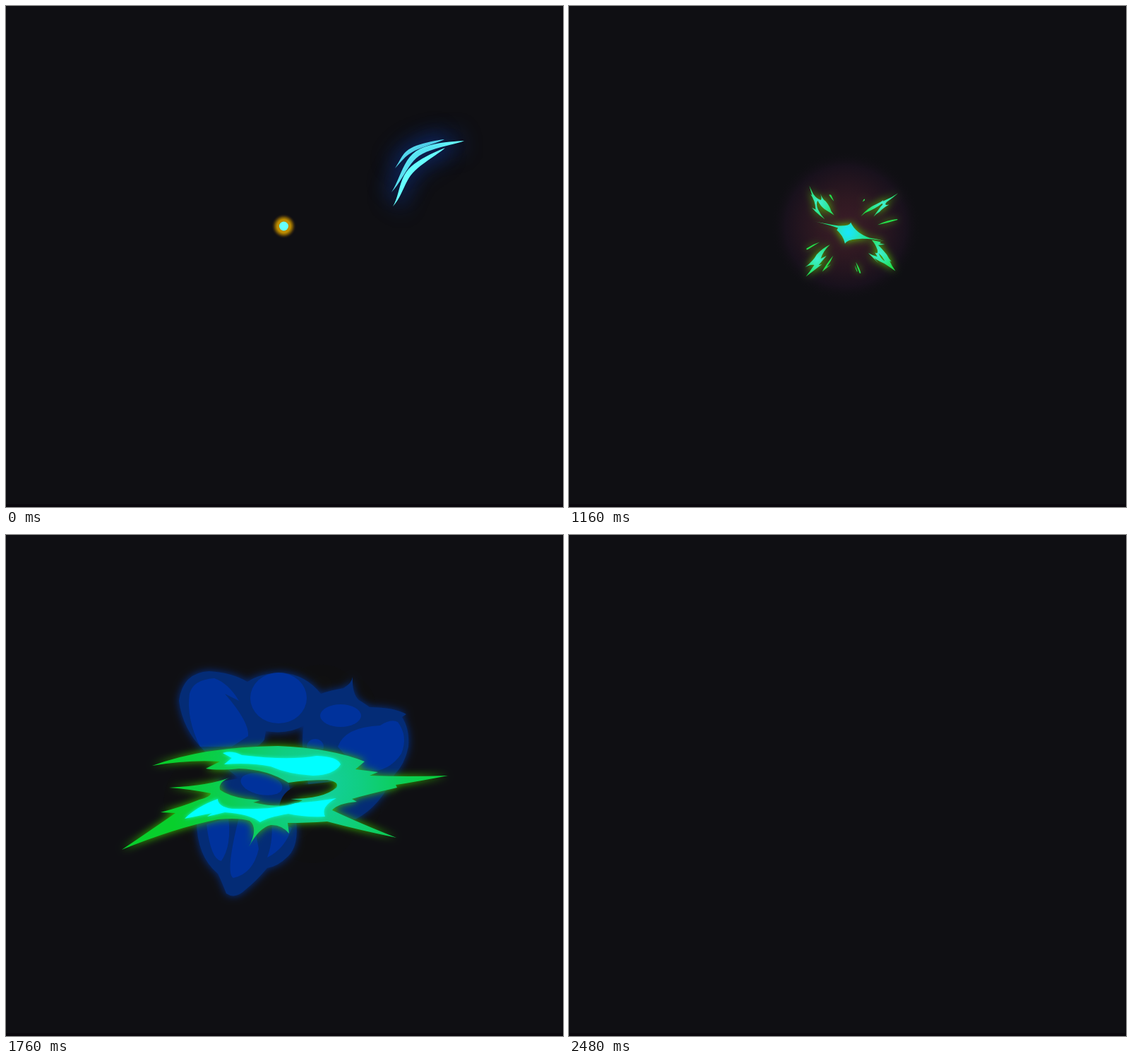
Write an HTML page with a canvas that moves like this. It is 789 px wide and 710 px high and loops after 2.92 s.

```html
<!DOCTYPE html>
<html lang="en">
<head>
<meta charset="utf-8">
<title>Energy burst</title>
<style>
  html, body { margin: 0; width: 100%; height: 100%; overflow: hidden; background: #0f0f13; }
  canvas { display: block; }
</style>
</head>
<body>
<canvas id="stage" width="789" height="710"></canvas>
<script>
const ctx = document.getElementById('stage').getContext('2d');
const LOOP = 2920, STEP = 40, CX = 393.5, CY = 312;

const clamp = (x, a = 0, b = 1) => Math.min(b, Math.max(a, x));
const ramp = (t, a, b) => clamp((t - a) / (b - a));
const pulse = (t, a, b, c, d) => ramp(t, a, b) * (1 - ramp(t, c, d));
const mix = (a, b, k) => `rgb(${a.map((v, i) => Math.round(v + (b[i] - v) * k))})`;
const shape = d => new Path2D(d);

// Piecewise linear value from [time, value] pairs
function keyed(t, keys) {
  if (t <= keys[0][0]) return keys[0][1];
  for (let i = 1; i < keys.length; i++) {
    const [a, x] = keys[i - 1], [b, y] = keys[i];
    if (t <= b) return x + (y - x) * (t - a) / (b - a);
  }
  return keys[keys.length - 1][1];
}

function radial(x, y, r0, r1, stops) {
  const g = ctx.createRadialGradient(x, y, r0, x, y, r1);
  stops.forEach(([at, color]) => g.addColorStop(at, color));
  return g;
}

function disc(x, y, r, fill) {
  ctx.fillStyle = fill;
  ctx.beginPath();
  ctx.arc(x, y, r, 0, 7);
  ctx.fill();
}

function oval(x, y, rx, ry, turn = 0) {
  ctx.beginPath();
  ctx.ellipse(x, y, rx, ry, turn, 0, 7);
  ctx.fill();
}

function glowFill(path, fill, glow, blur) {
  ctx.shadowColor = glow;
  ctx.shadowBlur = blur;
  ctx.fillStyle = fill;
  ctx.fill(path, 'evenodd');
  ctx.shadowBlur = 0;
}

// Draw scaled around a point with a given opacity
function layer(alpha, scale, x, y, draw) {
  if (alpha <= 0 || scale <= 0) return;
  ctx.save();
  ctx.globalAlpha = alpha;
  ctx.translate(x, y);
  ctx.scale(scale, scale);
  ctx.translate(-x, -y);
  draw();
  ctx.restore();
}

/* ---- charging streaks ---- */

const HUB = [CX, CY];
const streak = (start, lo, hi, speed, width, pts) => ({ start, lo, hi, speed, width, pts: [...pts, HUB] });

const streaks = [
  streak(0, 0, 2, .018, 6, [[621, 189], [575, 204], [551, 230], [505, 295], [445, 325]]),
  streak(0, 0, 2, .018, 8, [[649, 191], [583, 209], [546, 264], [500, 315], [440, 332]]),
  streak(0, 0, 2, .018, 8, [[622, 201], [573, 234], [548, 284], [505, 325], [445, 336]]),
  streak(320, 1, 3, .015, 7, [[560, 165], [473, 219], [438, 270], [408, 303]]),
  streak(320, 1, 3, .015, 5, [[575, 170], [491, 221], [464, 251], [439, 285], [412, 304]]),
  streak(320, 1, 3, .015, 5, [[322, 190], [336, 270], [354, 292], [380, 305]]),
  streak(320, 1, 5, .02, 7, [[480, 505], [412, 469], [382, 424], [365, 365], [369, 335], [384, 318]])
];

[40, 60, 350, 400, 450, 500, 540].forEach((start, i) => {
  const turn = 3.6 + i * 2.4;
  const reach = 150 + 165 * Math.max(0, Math.cos(turn));
  const pts = [0, 1, 2, 3, 4].map(j => {
    const a = turn + j * .32, r = reach * (1 - j / 5);
    return [CX + r * Math.cos(a), CY + r * Math.sin(a)];
  });
  streaks.push(streak(start, -2, 0, .03, 6, pts));
});

function along(pts, u) {
  const last = pts.length - 1, i = Math.min(Math.floor(u), last - 1), f = u - i;
  const [a, b, c, d] = [i - 1, i, i + 1, i + 2].map(k => pts[clamp(k, 0, last)]);
  return [0, 1].map(k => b[k] + f / 2 * (c[k] - a[k]
    + f * (2 * a[k] - 5 * b[k] + 4 * c[k] - d[k] + f * (3 * (b[k] - c[k]) + d[k] - a[k]))));
}

function drawStreak(s, t) {
  const last = s.pts.length - 1, shift = (t - s.start) * s.speed;
  const lo = clamp(s.lo + shift, 0, last), hi = clamp(s.hi + shift, 0, last);
  if (hi - lo < .05) return;
  const n = 22, line = [], left = [], right = [];
  for (let i = 0; i <= n; i++) line.push(along(s.pts, lo + (hi - lo) * i / n));
  line.forEach(([x, y], i) => {
    const a = line[Math.max(0, i - 1)], b = line[Math.min(n, i + 1)];
    const dx = b[0] - a[0], dy = b[1] - a[1], len = Math.hypot(dx, dy) || 1;
    const w = s.width / 2 * Math.sin(Math.PI * i / n);
    left.push([x - dy / len * w, y + dx / len * w]);
    right.unshift([x + dy / len * w, y - dx / len * w]);
  });
  const trace = pts => {
    ctx.beginPath();
    pts.forEach(p => ctx.lineTo(...p));
  };
  ctx.save();
  ctx.filter = 'blur(13px)';
  ctx.lineWidth = 36;
  ctx.lineJoin = 'round';
  ctx.strokeStyle = 'rgba(10,55,165,.2)';
  trace(line);
  ctx.stroke();
  ctx.restore();
  ctx.fillStyle = '#66ffff';
  trace([...left, ...right]);
  ctx.fill();
}

function drawCore(t) {
  const s = t / 1000, r = 6.5 + 14.06 * s + 29.3 * s * s, k = ramp(t, 560, 720);
  const inner = mix([190, 140, 0], [226, 92, 196], k);
  const mid = mix([100, 74, 8], [122, 58, 80], k);
  const reach = r + 11 + 5 * k;
  disc(CX, CY, reach, radial(CX, CY, r * .9, reach, [[0, inner], [.3, inner], [.6, mid], [1, 'rgba(30,20,18,0)']]));
  disc(CX, CY, r, mix([102, 255, 255], [255, 255, 10], k));
}

/* ---- explosion ---- */

const star = shape('M233,271Q330,292 358,295Q405,297 410,281Q430,325 488,345Q520,350 549,358Q480,346 435,350Q395,352 386,369Q378,335 352,313L357,304Q300,285 233,271Z');

const bolts = [
  [280, 198, 'M237,127L254,163Q268,183 285,188Q291,180 283,161Q294,186 305,192Q322,212 329,235L326,230L341,251L300,225Q284,213 272,190Q264,205 274,227Q284,248 302,268Q283,255 262,235L248,219L264,227Q262,190 242,163L249,168Z'],
  [545, 205, 'M452,255Q480,220 520,203Q535,197 546,188L544,193Q580,178 607,159Q590,175 560,196Q545,212 570,207Q545,220 530,237Q515,246 505,257Q520,235 535,215Q548,203 540,202Q510,225 470,241L482,232Z'],
  [530, 410, 'M497,354L536,363L530,368L552,373L524,375Q540,390 560,415Q570,435 580,444L572,441Q580,460 596,483Q570,465 550,452Q530,443 508,430L525,450Q505,430 483,408Q500,418 521,424L511,407Q525,415 521,395Q512,370 497,354ZM526,408Q534,432 552,442Q543,422 526,408Z'],
  [270, 432, 'M324,373Q290,390 268,415Q255,440 220,468Q240,455 258,458Q240,485 223,507Q260,478 290,455L276,459Q295,437 309,420L285,432Q295,400 324,373Z']
].map(([x, y, d]) => ({ x, y, path: shape(d) }));

const slivers = shape('M319,166Q327,162 330,170L340,193Q329,181 319,166ZM459,195L464,185L469,183L468,189ZM522,291Q560,271 604,267L605,270Q565,283 522,291ZM281,363Q250,373 226,389L225,394L230,394ZM337,419Q305,458 291,486L327,457L310,466Q327,445 337,419ZM431,446Q436,470 447,493L452,493Q449,476 431,446ZM427,458Q429,475 436,487L438,485Z');

// x, y, rx, ry
const puffs = [
  [394, 275, 42, 50], [430, 262, 38, 36], [455, 280, 28, 42], [326, 359, 50, 48],
  [380, 340, 36, 46], [421, 375, 45, 45], [462, 355, 27, 42]
];

function drawPuffs() {
  puffs.forEach(([x, y, rx, ry], i) => {
    ctx.fillStyle = '#11110f';
    oval(x, y, rx, ry, .1 * (i % 3));
    ctx.fillStyle = '#151412';
    oval(x - rx * .15, y - ry * .1, rx * .35, ry * .65, .5);
  });
}

function drawBurst() {
  bolts.forEach(({ x, y, path }) => {
    glowFill(path, radial(x, y, 0, 78, [[0, '#40f0d0'], [.5, '#2ee89a'], [1, '#20e048']]), '#5fd800', 12);
  });
  glowFill(slivers, '#24e04c', '#5fd800', 10);
  glowFill(star, radial(400, 322, 0, 150, [[0, '#18e6fc'], [.14, '#1ee6e4'], [.35, '#28e6b0'], [.62, '#16e278'], [1, '#55f060']]), '#5fd800', 12);
}

function drawExplosion(t) {
  const r = keyed(t, [[1120, 60], [1240, 200], [1360, 255], [1480, 280]]);
  layer(pulse(t, 1120, 1220, 1380, 1640), 1, CX, CY, () => {
    disc(392, CY, r, radial(392, CY, 0, r, [
      [0, '#7c3046'], [.35, '#612838'], [.6, '#421d31'], [.8, '#26142a'], [1, 'rgba(15,15,19,0)']]));
  });
  layer(pulse(t, 1160, 1240, 1520, 1900), keyed(t, [[1160, .2], [1360, 1], [1760, 1.45]]), 392, 320, drawPuffs);
  drawBlueCloud(t);
  layer(pulse(t, 1120, 1160, 1380, 1540), keyed(t, [[1120, .15], [1240, .72], [1360, 1], [1540, 1.12]]), CX, 320, drawBurst);
}

/* ---- blue cloud and shock ring ---- */

const cloud = shape('M245,235Q250,195 288,193Q320,195 342,208Q360,196 390,195Q425,198 446,225Q460,220 478,217Q490,210 491,201Q490,225 500,234Q510,240 515,244Q550,244 567,254L561,258Q572,275 570,300Q565,325 550,340Q530,385 495,403L440,400Q425,350 420,300Q420,275 422,270Q400,283 368,278L366,290Q362,297 350,302L400,350L411,405Q415,440 400,455Q385,470 370,472Q355,490 340,502Q325,517 312,508Q305,490 300,480Q270,455 270,405L300,350L330,345L280,305Q250,275 245,235Z');
const cloudLight = shape('M260,225Q265,205 295,203Q315,210 330,235L310,225Q345,265 343,285L320,300L275,300Q255,260 260,225ZM470,300Q480,272 530,270Q545,260 555,265Q570,285 560,310Q540,340 500,335ZM284,410Q290,460 305,462Q320,440 315,400ZM330,400Q310,480 322,486Q350,480 358,445L350,400ZM375,400Q380,430 370,457Q395,445 405,415Z');

function drawBlueCloud(t) {
  layer(pulse(t, 1480, 1680, 1780, 1920), keyed(t, [[1480, .75], [1760, 1], [1920, 1.05]]), 400, 340, () => {
    glowFill(cloud, '#042c76', '#03308a', 12);
    ctx.fillStyle = '#00329c';
    ctx.fill(cloudLight);
    oval(386, 231, 40, 36);
    oval(474, 256, 29, 16);
    oval(438, 300, 12, 11);
    oval(362, 353, 30, 15, .2);
  });
}

const gap = shape('M387,385Q390,364 412,355L468,349Q472,368 415,377Z');
const ring = shape('M207,327Q280,300 385,299Q460,302 508,321L495,332L527,336L515,341Q570,343 626,341Q580,350 552,354L554,358Q510,368 490,374L497,378Q470,380 462,390Q500,408 553,429Q500,418 455,406Q425,408 399,408L401,423Q390,410 375,411Q358,415 344,442Q358,415 345,405Q330,400 300,403Q240,415 164,446Q210,415 240,394L219,393Q250,385 274,375Q290,371 290,366Q260,360 231,358Q290,355 319,343Q300,350 303,361Q315,370 340,374L360,376L350,379Q400,390 420,376L403,374Q450,374 468,358Q473,350 455,347Q425,347 400,351Q370,332 330,331Q300,334 283,331L303,321Q260,318 207,327Z');
const ringLight = shape('M307,309Q320,305 334,312Q400,320 440,313Q470,314 474,325Q465,340 435,341Q400,339 375,328Q345,322 309,325L320,316ZM253,402Q270,385 300,374Q300,385 320,388Q380,390 410,380Q440,378 468,373Q445,385 452,399Q420,400 400,395Q370,400 360,407Q345,395 310,393L285,399L292,394Z');

function drawRing(t) {
  layer(pulse(t, 1640, 1720, 1780, 1940), keyed(t, [[1640, .55], [1760, 1], [1940, 1.7]]), 394, 365, () => {
    ctx.fillStyle = '#0f0f13';
    ctx.fill(gap);
    glowFill(ring, radial(440, 352, 0, 210, [[0, '#14d0a2'], [.3, '#10ce82'], [.6, '#0bce54'], [1, '#08cf2c']]), '#38c000', 12);
    glowFill(ringLight, '#00ffff', '#00ffe0', 5);
  });
}

/* ---- dissolving wisps and lightning ---- */

const wisps = [
  'M295,183Q260,175 238,205Q222,230 232,255Q245,300 280,313Q300,320 318,320Q285,312 260,290Q240,268 252,252Q265,248 270,265Q285,290 333,291Q300,285 297,270Q298,258 312,262Q308,235 275,222Q272,205 316,210Q285,202 283,192Z',
  'M323,208Q355,207 368,205Q350,190 360,182Q385,174 415,183Q450,197 468,226L462,237Q440,233 430,226Q420,240 400,257Q412,238 380,222Q350,212 323,208Z',
  'M470,238Q490,228 520,247Q555,235 583,262Q575,262 580,270Q592,295 580,325Q572,338 560,332Q562,370 545,395Q520,420 490,421Q467,420 466,403Q470,390 481,391Q476,405 488,407Q502,395 485,368Q510,385 528,390Q535,365 500,345Q470,340 460,315Q490,325 490,300Q480,280 495,262Q490,248 470,238Z',
  'M270,327Q285,320 310,325Q330,332 333,348Q320,347 315,360Q285,390 290,420Q300,450 320,462L317,447Q335,480 370,475Q395,470 401,454Q395,485 360,493Q345,495 338,510L346,511Q325,530 303,529Q290,525 280,500Q252,465 253,410Q255,370 285,346Q272,340 270,327Z',
  'M352,327Q364,327 368,339Q355,338 352,327ZM421,347Q432,340 439,345L438,349Z'
].map(shape);
const wispLight = shape('M282,186Q230,200 236,248Q250,270 300,258Q262,240 258,220Q262,197 282,186ZM362,192Q390,178 420,198Q438,212 438,224L425,222Q402,200 362,192ZM290,368Q258,400 264,450Q272,515 305,525Q335,515 342,492Q310,478 300,462Q268,430 290,368Z');
const lightning = shape('M433,203L425,225L422,258Q405,268 402,290Q400,310 387,325Q396,305 398,290Q400,272 418,256L422,226L417,226ZM418,320L390,348L382,360L384,338L386,347ZM395,240Q368,252 365,256L366,270L370,258Q385,254 395,240ZM473,254Q447,268 446,276L451,281L450,274Q458,264 473,254ZM488,233L480,246L481,239Z');

function drawWisps(t) {
  layer(pulse(t, 1800, 1960, 2080, 2280), 1, 392, 322, () => {
    disc(392, 322, 186, radial(392, 322, 0, 186, [
      [0, '#143614'], [.45, '#122c14'], [.8, '#101b13'], [1, 'rgba(15,15,19,0)']]));
  });
  layer(pulse(t, 1780, 1900, 2080, 2480), keyed(t, [[1780, .94], [2040, 1], [2480, 1.04]]), 400, 340, () => {
    const fill = radial(392, 322, 60, 225, [[0, '#0c4d7c'], [.6, '#084184'], [1, '#02349a']]);
    wisps.forEach(w => glowFill(w, fill, '#023a8c', 10));
    ctx.fillStyle = 'rgba(0,52,176,.6)';
    ctx.fill(wispLight);
    oval(535, 275, 35, 26, -.2);
    oval(538, 333, 10, 14, .3);
    oval(573, 304, 5, 16);
    oval(296, 332, 20, 8, .2);
  });
  layer(pulse(t, 1900, 1960, 2100, 2200), 1, 400, 300, () => glowFill(lightning, '#66ffff', '#4ad820', 10));
}

function draw(t) {
  ctx.fillStyle = '#0f0f13';
  ctx.fillRect(0, 0, 789, 710);
  if (t < 1160) {
    if (t < 800) streaks.forEach(s => drawStreak(s, t));
    drawCore(t);
  }
  if (t >= 1120 && t < 2480) {
    drawExplosion(t);
    drawWisps(t);
    drawRing(t);
  }
  ctx.fillStyle = '#0a080d';
  ctx.fillRect(0, 706, 789, 4);
  ctx.fillRect(788, 0, 1, 710);
}

const begin = performance.now();
function tick() {
  const t = (performance.now() - begin) % LOOP;
  draw(Math.floor(t / STEP) * STEP);
  requestAnimationFrame(tick);
}
tick();
</script>
</body>
</html>
```
